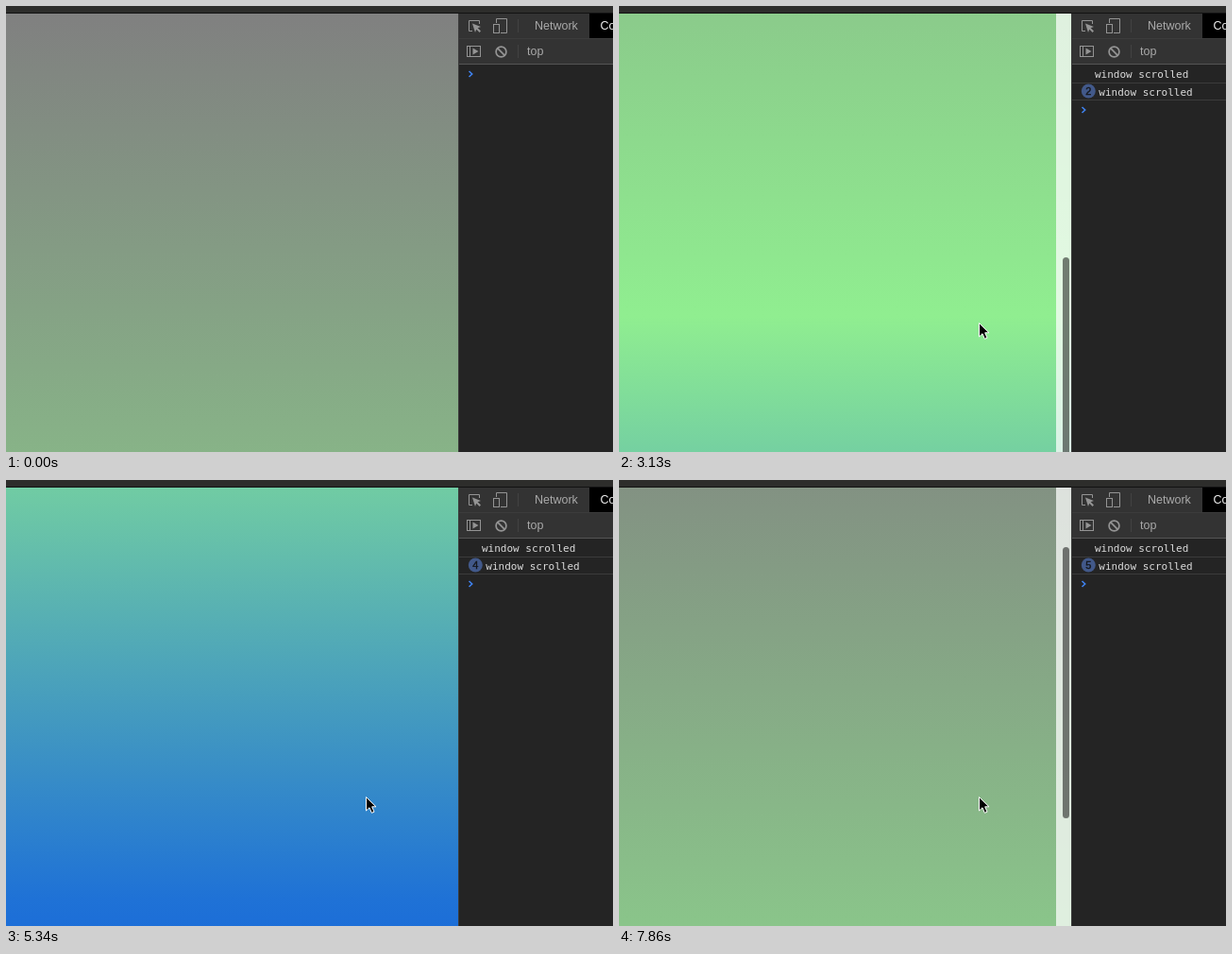
Recreate the animation shown at these times as an HTML page. Size 643 by 472 pixels, loop 8000 ms.

```html
<!DOCTYPE html>
<html lang="en">
<head>
<meta charset="utf-8">
<title>Scroll logging</title>
<style>
  html, body { margin: 0; width: 100%; height: 100%; overflow: hidden; background: #242424; }
  svg { display: block; width: 643px; height: 472px; }
  .ui { font: 12.5px "Liberation Sans", Arial, sans-serif; fill: #a9a9a9; }
  .log { font: 11px "DejaVu Sans Mono", monospace; fill: #dcdcdc; }
  .badge { font: 11px "Liberation Sans", Arial, sans-serif; fill: #15181d; stroke: #15181d; stroke-width: .4; text-anchor: middle; }
  .icon { fill: none; stroke: #949494; stroke-width: 1; }
  .solid { fill: #949494; }
  .rule { fill: #3c3c3c; }
</style>
</head>
<body>
<svg viewBox="0 0 643 472">
  <defs>
    <linearGradient id="sky" x1="0" y1="0" x2="0" y2="1">
      <stop offset="0" stop-color="#808080"/>
      <stop offset=".5" stop-color="#90ee90"/>
      <stop offset=".8" stop-color="#1f72d6"/>
      <stop offset=".84" stop-color="#1868da"/>
    </linearGradient>
    <clipPath id="view"><rect y="8" width="479" height="464"/></clipPath>
  </defs>

  <g clip-path="url(#view)">
    <rect id="page" y="8" width="479" height="2000" fill="url(#sky)"/>
    <g id="bar">
      <rect id="track" x="463" y="8" width="16" height="464" fill="#fff"/>
      <rect id="thumb" x="470" width="7" height="287" rx="3.5" fill="#000" fill-opacity=".5"/>
    </g>
  </g>

  <rect width="643" height="7" fill="#2d2d2b"/>
  <rect y="7" width="643" height="1" fill="#121212"/>
  <rect x="479" y="8" width="1" height="464" fill="#3a3a3a"/>

  <!-- toolbars -->
  <rect x="480" y="8" width="163" height="53" fill="#333"/>
  <rect class="rule" x="480" y="34" width="163" height="1"/>
  <rect x="480" y="61" width="163" height="1" fill="#555"/>
  <rect x="618" y="8" width="25" height="26" fill="#000"/>
  <rect x="542" y="14" width="1" height="14" fill="#424242"/>
  <rect x="542" y="41" width="1" height="14" fill="#424242"/>
  <text class="ui" x="560" y="25">Network</text>
  <text class="ui" x="629.5" y="25" style="fill:#eee">Console</text>
  <text class="ui" x="552" y="52">top</text>

  <g class="icon">
    <path d="M494 26.5H490.5V15.5H501.5V19"/>
    <path d="M519.5 18V13.5H530.5V28.5H524"/>
    <rect x="516.5" y="19.5" width="6" height="9"/>
    <rect x="488.5" y="42.5" width="14" height="11"/>
    <path d="M491.5 42.5V53.5"/>
    <circle cx="524.5" cy="48.5" r="5.4" stroke-width="1.7"/>
    <path d="M520.7 44.7L528.3 52.3" stroke-width="1.7"/>
  </g>
  <path class="solid" d="M494 18.5L503 22L499.7 23.2L503 26.5L501.6 28L498.3 24.7L497 28Z"/>
  <path class="solid" d="M494.5 44.5L500.5 48L494.5 51.5Z"/>

  <!-- console -->
  <g id="first">
    <text class="log" x="504" y="76">window scrolled</text>
    <rect class="rule" x="480" y="81" width="163" height="1"/>
  </g>
  <g id="second">
    <g id="badge">
      <circle cx="497.3" cy="90" r="7.5" fill="#42598a"/>
      <text id="count" class="badge" x="497.3" y="94"></text>
    </g>
    <text id="repeat" class="log" y="95">window scrolled</text>
    <rect class="rule" x="480" y="99" width="163" height="1"/>
  </g>
  <path id="prompt" d="M490.5 69L493.7 72L490.5 75" fill="none" stroke="#3f83f0" stroke-width="1.6"/>

  <path id="cursor" d="M.5 .5V15L4 11.8L6.4 17.3L9 16.2L6.7 10.8H11Z" fill="#000" stroke="#fff" stroke-width="1" stroke-linejoin="round"/>
</svg>
<script>
const LOOP = 8000, STEPS = 54;

// [step, scroll offset]
const scrollKeys = [
  [0, 0], [3, 0], [4, 14], [5, 55], [7, 160], [8, 200], [9, 226], [10, 236], [11, 236],
  [12, 240], [14, 310], [19, 570], [21, 680], [23, 840], [26, 1060], [27, 1110],
  [28, 1143], [29, 1158], [30, 1166], [42, 1166], [43, 1114], [44, 930], [45, 730],
  [46, 560], [47, 430], [48, 335], [49, 265], [50, 215], [51, 186], [52, 170], [53, 163]
];
const logSteps = [4, 10, 19, 26, 33, 50];

const el = id => document.getElementById(id);
const parts = Object.fromEntries(
  ["page", "bar", "track", "thumb", "first", "second", "badge", "count", "repeat", "prompt", "cursor"]
    .map(id => [id, el(id)]));
const show = (node, on) => node.setAttribute("visibility", on ? "inherit" : "hidden");
const move = (node, x, y) => node.setAttribute("transform", `translate(${x} ${y})`);

function scrollAt(step) {
  const i = scrollKeys.findIndex(k => k[0] >= step);
  const [s1, y1] = scrollKeys[i];
  if (s1 === step) return y1;
  const [s0, y0] = scrollKeys[i - 1];
  return Math.round(y0 + (y1 - y0) * (step - s0) / (s1 - s0));
}

function barOpacity(step) {
  if (step < 4) return 0;
  if (step < 35 || step >= 43) return 1;
  return step === 35 ? 0.5 : 0;
}

function draw(step) {
  const p = parts;
  const scroll = scrollAt(step);
  move(p.page, 0, -scroll);
  move(p.thumb, 0, 9.5 + scroll / 2.65);
  p.bar.setAttribute("opacity", barOpacity(step));
  p.track.setAttribute("opacity", step <= 12 ? 0.55 : 0.73);

  const logs = logSteps.filter(s => s <= step).length;
  const count = logs - 1;
  show(p.first, logs > 0);
  show(p.second, logs > 1);
  show(p.badge, count > 1);
  p.count.textContent = count;
  p.repeat.setAttribute("x", count > 1 ? 508.3 : 504);
  move(p.prompt, 0, [0, 20, 38][Math.min(logs, 2)]);

  show(p.cursor, step > 0);
  move(p.cursor, step === 1 ? 398 : 381, step === 1 ? 343 : 335);
}

let last = -1;
function tick() {
  const step = Math.floor(performance.now() % LOOP / LOOP * STEPS);
  if (step !== last) draw(last = step);
  requestAnimationFrame(tick);
}
tick();
</script>
</body>
</html>
```
